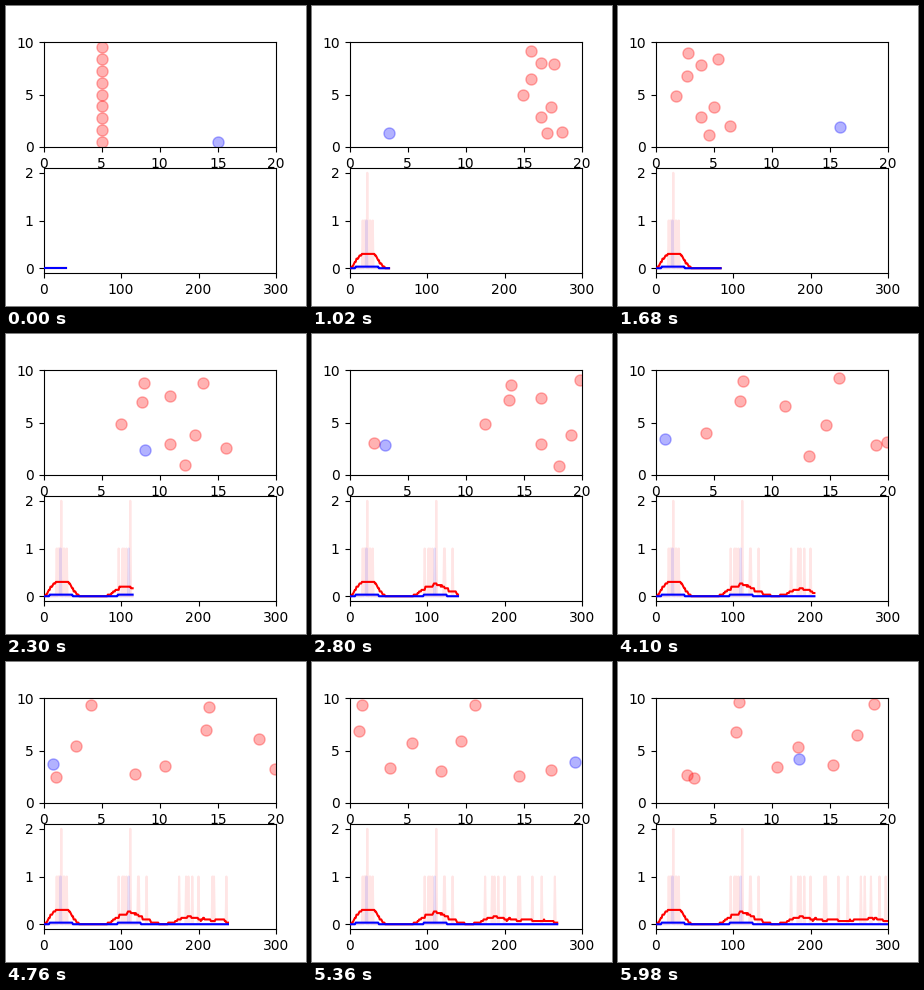
Animation of 300x300 px, one loop 6 s. Source, as a matplotlib script:

```python
import numpy as np
import matplotlib.pyplot as plt
from matplotlib.animation import FuncAnimation

FRAMES, WINDOW, LENGTH = 300, 30, 20
GATE = 10
MEAN_SPEED = .227
T = np.arange(FRAMES)


def walk(x, speed, lanes, heading=1, hold=(0, 0)):
    """Unwrapped path: steady pace with a slight surge, pausing during hold."""
    begin, end = hold
    steps = T - np.clip(T - begin, 0, end - begin)
    surge = 20 * (speed - MEAN_SPEED) * np.sin(2 * np.pi * steps / 100)
    xs = x + heading * (speed * steps + surge)
    return np.column_stack([xs, np.interp(T, (0, 150, 299), lanes)])


# Speed, height midway and height at the end, from the lowest walker up.
traits = [(.262, 3.2, 2.4), (.235, .8, 3.6), (.225, 3, 3.4),
          (.242, 3.8, 6.5), (.193, 4.8, 2.7), (.207, 7.2, 6.8),
          (.247, 9.2, 9.4), (.225, 7.3, 5.3), (.208, 8.5, 9.6)]
red = [walk(5, speed, (start, mid, end))
       for start, (speed, mid, end) in zip(np.linspace(.5, 9.5, 9), traits)]

# The blue walker and the third red one meet head-on and block each other.
red[2] = walk(5, .225, (2.75, 3, 3.4), hold=(155, 252))
blue = [walk(15, .228, (.5, 3, 4.2), heading=-1, hold=(150, 262))]

fig, (top, low) = plt.subplots(2, 1, figsize=(3, 3), dpi=100)
top.set(xlim=(0, LENGTH), ylim=(0, 10), xticks=range(0, 21, 5), yticks=(0, 5, 10))
low.set(xlim=(0, FRAMES), ylim=(-.1, 2.1), xticks=range(0, 301, 100), yticks=(0, 1, 2))

groups = []
for walkers, color in ((red, "red"), (blue, "blue")):
    paths = np.array(walkers)
    laps = np.floor((paths[..., 0] - GATE) / LENGTH)
    counts = np.abs(np.diff(laps, axis=1, prepend=laps[:, :1])).sum(axis=0)
    paths[..., 0] %= LENGTH
    dots, = top.plot([], [], "o", ms=8, color=color, alpha=.3)
    raw, = low.plot([], [], color=color, alpha=.1)
    mean, = low.plot([], [], color=color, zorder=3)
    groups.append((paths, counts, dots, raw, mean))


def draw(n):
    for paths, counts, dots, raw, mean in groups:
        dots.set_data(*paths[:, n].T)
        seen = counts[:n + 1]
        raw.set_data(T[:n + 1], seen)
        flow = np.convolve(seen, np.ones(WINDOW) / WINDOW, mode="same")
        mean.set_data(T[:len(flow)], flow)
    return [artist for group in groups for artist in group[2:]]


anim = FuncAnimation(fig, draw, frames=FRAMES, interval=20, repeat=True, repeat_delay=0)
plt.show()
```
